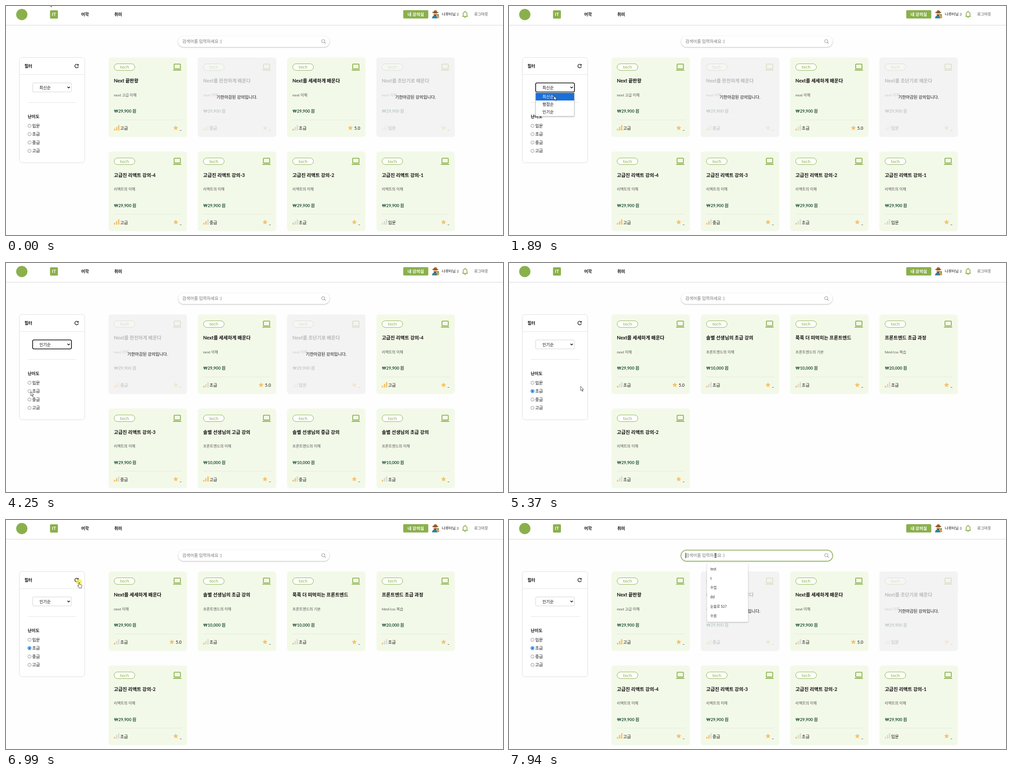
Write an HTML page that moves like this. It is 1101 by 509 pixels and loops after 8 s.

```html
<!DOCTYPE html>
<html lang="ko">
<head>
<meta charset="utf-8">
<title>강의 목록</title>
<style>
html, body { margin: 0; width: 100%; height: 100%; overflow: hidden; background: #fefefe; }
svg { display: block; width: 100%; height: 100%; }
text { font-family: Lato, "Noto Sans CJK KR", "Noto Sans CJK", sans-serif; white-space: pre; }
.b { font-weight: 700; }
.sys { font-family: "Noto Sans CJK KR", "Noto Sans CJK", sans-serif; }
.shadow { filter: drop-shadow(0 1px 1.5px #0004); }
</style>
</head>
<body>
<svg id="stage" viewBox="0 0 1101 509"></svg>
<script>
const LOOP = 8000, GREEN = '#8ab04c';
const LEVELS = ['입문', '초급', '중급', '고급'];
const SORTS = ['최신순', '평점순', '인기순'];
const HINTS = ['test', 't', '수업', 'dd', '눈솔로 527', '수원'];

// Course: title, summary, price, level, rating, closed
const next = (word, level, rating, closed) =>
  [`Next를 ${word} 배운다`, 'next 이해', '29,900', level, rating, closed];
const react = n => [`고급진 리액트 강의-${n}`, '리액트의 이해', '29,900', n - 1];
const tutor = level => [`솔별 선생님의 ${LEVELS[level]} 강의`, '프론트엔드의 이해', '10,000', level];
const full = next('완전하게', 2, '_', true);
const fine = next('세세하게', 1, '5.0');
const quick = next('초단기로', 0, '_', true);
const newest = [['Next 끝판왕', 'next 고급 이해', '29,900', 3], full, fine, quick,
  react(4), react(3), react(2), react(1)];
const popular = [full, fine, quick, react(4), react(3), tutor(3), tutor(2), tutor(1)];
const beginner = [fine, tutor(1),
  ['푹푹 더 떠먹히는 프론트엔드', '프론트엔드의 기본', '10,000', 1],
  ['프론트엔드 초급 과정', 'html/css 복습', '20,000', 1], react(2)];

// Pointer moves: start, end, steps, x, y, optional bend
const START = [96, -9];
const MOVES = [
  [260, 1020, 12, 106, 159],
  [1090, 1230, 3, 103, 188],
  [1700, 2300, 9, 90, 234],
  [3690, 4250, 8, 55, 286],
  [4980, 5440, 8, 178, 272],
  [6230, 6990, 12, 162, 138, 210, 215],
  [7390, 7800, 7, 457, 79]
];

const text = (x, y, s, size = 9.3, fill = '#111', cls = '', anchor = 'start') =>
  `<text x="${x}" y="${y}" font-size="${size}" fill="${fill}" class="${cls}" text-anchor="${anchor}">${s}</text>`;
const rect = (x, y, w, h, r, fill, extra = '') =>
  `<rect x="${x}" y="${y}" width="${w}" height="${h}" rx="${r}" fill="${fill}" ${extra}/>`;
const circle = (x, y, r, fill, extra = '') =>
  `<circle cx="${x}" cy="${y}" r="${r}" fill="${fill}" ${extra}/>`;
const line = (d, color, width = 1, fill = 'none') =>
  `<path d="${d}" fill="${fill}" stroke="${color}" stroke-width="${width}"/>`;
const shape = (d, fill) => `<path d="${d}" fill="${fill}"/>`;
const group = (x, y, body) => `<g transform="translate(${x} ${y})">${body}</g>`;

function star(cx, cy) {
  let d = '';
  for (let i = 0; i < 10; i++) {
    const r = i % 2 ? 2.8 : 6, a = (i / 5 - .5) * Math.PI;
    d += `${i ? 'L' : 'M'}${(cx + r * Math.cos(a)).toFixed(2)} ${(cy + r * Math.sin(a)).toFixed(2)}`;
  }
  return shape(d + 'Z', '#f6c26b');
}

function card([title, summary, price, level, rating = '_', closed], i) {
  let s = rect(12.5, 14.3, 46, 14.6, 7.3, '#fff', `stroke="${GREEN}"`)
    + text(35.5, 25.1, 'tech', 10.3, GREEN, '', 'middle')
    + rect(145.4, 14.9, 14, 10.6, 1, 'none', `stroke="${GREEN}" stroke-width="1.8"`)
    + rect(143, 27.4, 18.6, 2, .8, GREEN)
    + text(12, 56, title, 10.5, '#111', 'b')
    + text(12, 86.7, summary, 8.2, '#555')
    + text(12, 123.3, `₩${price} 원`, 9.2, '#24543f', 'b')
    + line('M12 139H162', '#e4e9dd')
    + text(26, 161, LEVELS[level])
    + star(rating === '_' ? 149 : 140.3, 157)
    + text(162, 161, rating, 9.3, '#111', '', 'end');
  for (let n = 0; n < 3; n++)
    s += rect(12 + n * 4.6, 158.5 - n * 4, 3, 4 + n * 4, .4, n < level ? '#f6c26b' : '#d9dad6');
  if (closed)
    s = `<g opacity=".25">${s}</g>`
      + text(86.8, 91.7, '기한마감된 강의입니다.', 9.3, '#111', '', 'middle');
  return group(227 + i % 4 * 197.8, 114.2 + (i >> 2) * 209.3,
    rect(0, 0, 174, 177, 6, closed ? '#f3f3f3' : '#f3f9e8') + s);
}

function avatar() {
  return shape('M944 27.5Q944 21 950 21Q956 21 956 27.5Z', '#2f7f9c')
    + circle(951, 17.5, 4, '#f3b98c')
    + shape('M947 19Q951 25 955 19Z', '#6b4327')
    + shape('M947 14Q947.5 9 951 9.5Q955 9 955 14Z', '#a5672f')
    + `<ellipse cx="951" cy="14.4" rx="7" ry="1.6" fill="#8a5023"/>`
    + rect(954.5, 22, 5, 5, .8, '#e0984a') + circle(957, 20, 2.2, '#6f9f45');
}

function header() {
  return rect(0, 0, 1101, 42, 0, '#fff') + rect(0, 42, 1101, 1.4, 0, '#e0e1e5')
    + circle(35, 19, 12.5, GREEN)
    + rect(97.5, 9.5, 17.5, 18.5, 2, GREEN) + text(106.3, 22.4, 'IT', 10, '#fff', 'b', 'middle')
    + text(166.5, 22, '어학', 9.3, '#111', 'b') + text(240, 22, '취미', 9.3, '#111', 'b')
    + rect(880, 9.3, 55.5, 18.5, 2, GREEN)
    + text(907.8, 22, '내 강의실', 9.3, '#fff', 'b', 'middle')
    + avatar() + text(965.5, 21.4, '나루터님 :)', 8.3)
    + line('M1011 23.2H1023M1012.7 23V17.5A4.3 4.3 0 0 1 1021.3 17.5V23M1017 11V13', GREEN, 1.7)
    + shape('M1015 24.6H1019Q1019 26.6 1017 26.6Q1015 26.6 1015 24.6Z', GREEN)
    + text(1037.3, 21.4, '로그아웃', 8.3, '#444');
}

function search(focus) {
  return `<g class="shadow">${rect(381.5, 67, 335, 24, 12, '#fff')}</g>`
    + (focus ? rect(381, 67, 336, 24.5, 12.2, '#fff', 'stroke="#82a849" stroke-width="1.5"') : '')
    + text(390.5, 82.4, '검색어를 입력하세요 :)', 9.4, '#777')
    + (focus ? line('M391.3 73V85', '#111') : '')
    + circle(702.8, 78.2, 3.6, 'none', 'stroke="#8c8c8c"')
    + line('M705.4 80.8L708.3 83.7', '#8c8c8c', 1.1);
}

function filter(sort, ring, checked) {
  let s = rect(29.5, 114.5, 145, 234, 6, '#fff', 'stroke="#dedede"')
    + line('M30 152.5H174M48 214.5H156', '#e4e4e4')
    + text(41, 136.6, '필터', 9.3, '#111', 'b')
    + line('M159.7 131A4 4 0 1 0 160.4 134.4', '#111', 1.3)
    + shape('M160.8 128.8V132.4H157.2Z', '#111')
    + rect(59, 171, 86, 20, 3, '#fff', ring ? 'stroke="#101010" stroke-width="1.6"' : 'stroke="#d2d2d2"')
    + text(74, 184.5, sort, 9.1)
    + line('M136.2 179.6L138.8 182.2L141.4 179.6', '#111', 1.5)
    + text(48.3, 248.6, '난이도', 9.3, '#111', 'b');
  LEVELS.forEach((name, i) => {
    const y = 266.2 + i * 18.6, on = checked && i === 1;
    s += circle(52, y, 3.6, '#fff', `stroke="${on ? '#0b6fd8' : '#767676'}" stroke-width="${on ? 1.1 : .8}"`)
      + (on ? circle(52, y, 2.2, '#0b6fd8') : '') + text(58, y + 3.4, name);
  });
  return s;
}

function sortMenu(y) {
  const active = Math.max(0, Math.min(2, Math.floor((y - 193) / 17)));
  return `<g class="shadow">${rect(59, 192, 85.5, 53, 0, '#fff', 'stroke="#aaa" stroke-width=".6"')}</g>`
    + SORTS.map((name, i) => (i === active ? rect(59.3, 193 + i * 17, 85, 17, 0, '#1a6fd8') : '')
      + text(74, 205 + i * 17, name, 9.1, i === active ? '#fff' : '#111')).join('');
}

function hints() {
  return `<g class="shadow">${rect(438.5, 96, 91, 130.5, 3, '#fff')}${shape('M446 96.2L450 92.5L454 96.2Z', '#fff')}</g>`
    + HINTS.map((s, i) => text(446, 111.8 + i * 20.8, s, 7.7, '#222', 'sys')).join('');
}

function pointerAt(t) {
  let [x, y] = START;
  for (const [t0, t1, n, tx, ty, bx = (x + tx) / 2, by = (y + ty) / 2] of MOVES) {
    if (t < t0) break;
    const step = Math.floor((t - t0) / (t1 - t0) * (n - 1) + 1e-6);
    const p = Math.min(1, (step + 1) / n), k = p * p * (3 - 2 * p), q = 1 - k;
    x = q * q * x + 2 * q * k * bx + k * k * tx;
    y = q * q * y + 2 * q * k * by + k * k * ty;
  }
  return [x, y];
}

function pointer(x, y) {
  const inside = (l, t, r, b) => x >= l && x <= r && y >= t && y <= b;
  let s;
  if (inside(382, 67, 716, 91))
    s = line('M-2-4.5H-.6L0-4L.6-4.5H2M0-4V4M-2 4.5H-.6L0 4L.6 4.5H2', '#111', 1);
  else if (inside(97, 9, 115, 28) || inside(150, 127, 164, 141))
    s = line('M-1 7V1.4Q0 0 1 1.4V5L5 6Q6 6.3 6 7.5V9.5L5 13H0L-3.5 8.5Q-3.2 6.5-1 8.5Z', '#222', .8, '#fff');
  else
    s = line('M0 0V9.2L2.1 7.3L3.8 11.2L5.3 10.5L3.7 6.8H6.4Z', '#222', .8, '#fff');
  return group(x.toFixed(2), y.toFixed(2), s);
}

function scene(t) {
  const [x, y] = pointerAt(t), during = (a, b) => t >= a && t < b;
  const list = during(2900, 4980) ? popular : during(4980, 7060) ? beginner : newest;
  const focus = t >= 7870;
  return header() + search(focus)
    + filter(t < 2570 ? SORTS[0] : SORTS[2], during(1370, 4450), t >= 4580)
    + list.map(card).join('')
    + (during(1370, 2570) ? sortMenu(y) : '')
    + (focus ? hints() : '')
    + (during(6990, 7060) ? circle(162, 138, 6.8, '#f7ee3c', 'opacity=".75"') : '')
    + pointer(x, y);
}

const stage = document.getElementById('stage');
let shown = '';
function frame() {
  const html = scene(performance.now() % LOOP);
  if (html !== shown) stage.innerHTML = shown = html;
  requestAnimationFrame(frame);
}
frame();
</script>
</body>
</html>
```
